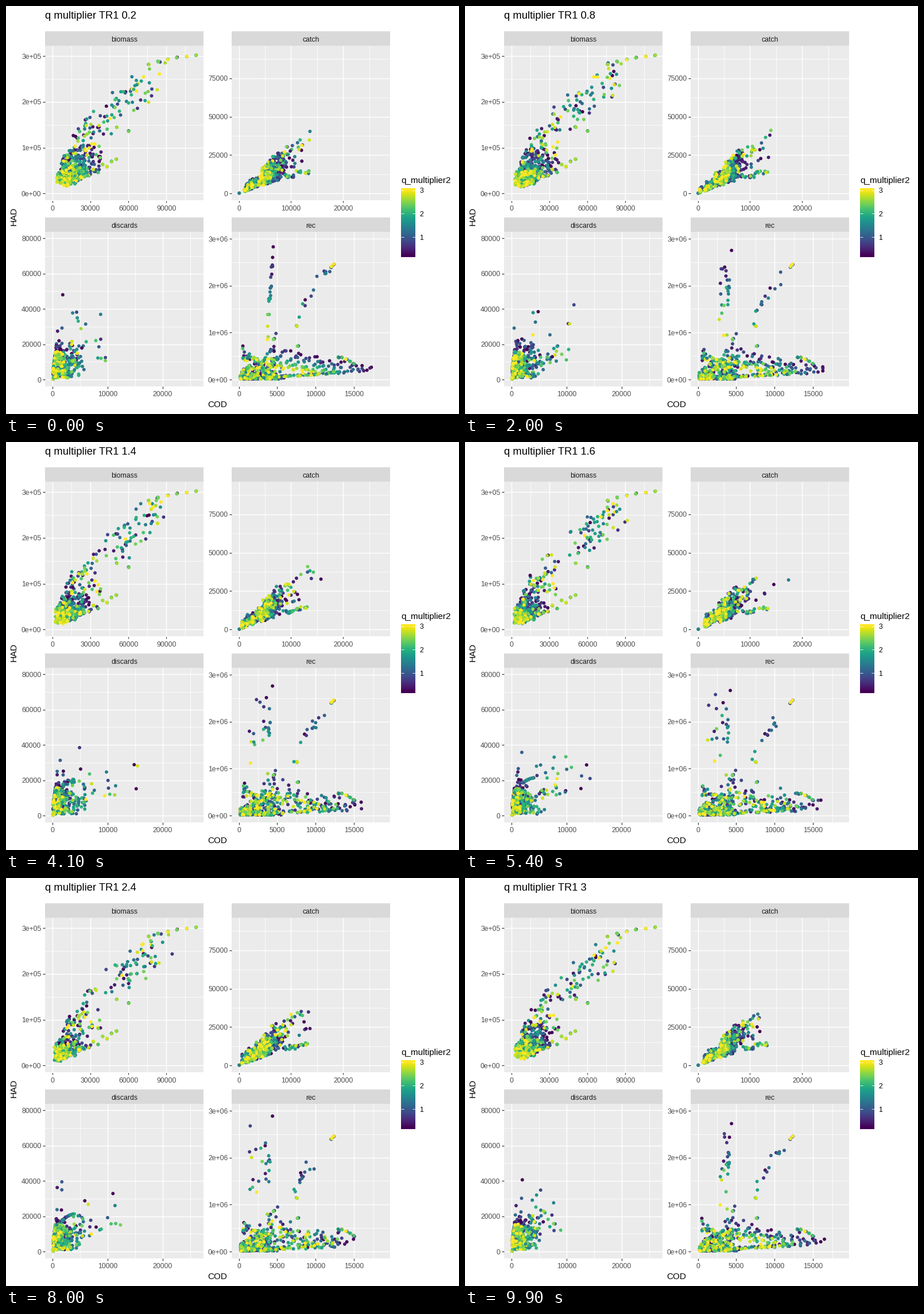
A matplotlib script that plays this animation: 789x710 px, repeating every 10000 ms.

```python
import numpy as np
import matplotlib.pyplot as plt
from matplotlib.animation import FuncAnimation
from matplotlib.patches import Rectangle

W, H, DPI = 789, 710, 100
PT = 72 / DPI
plt.rcParams["font.family"] = "Liberation Sans"

Q = np.linspace(0.2, 3, 15)
STATES = np.linspace(0.2, 3, 15)
# Frame at which each state is reached; the last entry closes the loop.
ARRIVALS = np.cumsum([0, 6] + [7] * 10 + [6] * 4)
MOVE_FRAMES = 3


class Dice:
    """Random numbers that drift from state to state around shared values."""

    def __init__(self, panel, state):
        self.base = np.random.default_rng(panel + 1)
        self.fresh = np.random.default_rng(1000 + 50 * panel + state)

    def u(self, n):
        v = self.base.random(n) + 0.4 * (self.fresh.random(n) - 0.5)
        return 1 - np.abs(1 - np.abs(v))

    def years(self, n):
        return np.repeat(self.u(n), len(Q))

    def spread(self, n, size):
        return size * (2 * self.u(n) - 1)

    def tail(self, n):
        return np.minimum(self.fresh.exponential(size=n), 3.5)

    def q(self, n, top=len(Q)):
        return self.base.choice(Q[:top], n)


def levels(n):
    return np.resize(Q, n)


def effort(dice, q, t):
    """Fishing pressure from 0 to 1; the second multiplier matters less as t grows."""
    weight = 0.88 - 0.2 * t
    return weight * q / 3 + (1 - weight) * dice.u(len(q))


def unrest(t):
    return np.sin(np.pi * t / 3.2)


def fixed(dice, x, y, jitter):
    """Years that hardly react: a few overlapping dots, a bright one often on top."""
    x, y = np.repeat(x, 3), np.repeat(y, 3)
    n = len(x)
    q = np.where(np.arange(n) % 3 == 2, dice.base.choice(Q[9:], n), dice.q(n))
    return x + dice.spread(n, jitter[0]), y + dice.spread(n, jitter[1]), q


def join(*parts):
    x, y, q = (np.concatenate(column) for column in zip(*parts))
    return x * 1000, y * 1000, q


def biomass(dice, t):
    def ceiling(x):
        return 315 * (1 - np.exp(-x / 32))

    calm = min(1, (t - 0.2) / 1.4)

    q = levels(26 * 15)
    n = len(q)
    ratio = 1.4 * 4.5 ** np.clip(dice.years(26) + dice.spread(n, .3), 0, 1)
    reach = .17 + .38 * dice.years(26) ** 1.3
    shrink = np.exp(-(.75 + .3 * t) * effort(dice, q, t) - .2 * (t - .2) * dice.u(n))
    x = 115 * reach * shrink / np.hypot(1, .377 * ratio)
    y = np.minimum(ratio * x, ceiling(x) * (1 - .4 * dice.u(n)))
    cloud = x, y + (25 + 20 * calm) * dice.u(n) ** 2 * np.exp(-x / 9), q

    n = 65
    p = dice.u(n)
    x0, y0 = 30 + 20 * calm, 145 + 40 * calm
    x = x0 + (88 - x0) * p + dice.spread(n, 11)
    y = y0 + (268 - y0) * p + dice.spread(n, 32)
    upper = x, np.minimum(y, ceiling(x) * (1 - .06 * dice.u(n))), dice.q(n)

    n = 65
    x = 7 + 32 * dice.u(n)
    y = np.minimum(75 + 100 * dice.u(n) ** 1.4, ceiling(x) * (1.05 - .35 * dice.u(n)))
    middle = x, y, dice.q(n)

    crest = np.linspace(76, 113.5, 6)
    foot = np.linspace(18, 50.5, 10)
    history = fixed(dice, np.r_[crest, foot, 60.5, 51],
                    np.r_[ceiling(crest) - 4, 1.45 * foot + 6 * np.sin(foot), 136, 145], (.3, .8))
    return join(cloud, upper, middle, history)


def catch(dice, t):
    q = levels(28 * 15)
    n = len(q)
    ratio = 1.15 + 2.1 * np.clip(dice.years(28) + dice.spread(n, .3), 0, 1) ** 1.5
    x = 10 * dice.years(28) ** .6 * np.exp(-.55 * effort(dice, q, t) - .15 * t * dice.u(n))
    cloud = x, ratio * x + 6 * dice.u(n) ** 2 * (.3 + t / 3), q

    n = 50
    p = .4 * dice.tail(n)
    arm = 6.8 + 4.8 * p + dice.spread(n, .8), 17 + 14 * p + dice.spread(n, 6), dice.q(n)

    n = 22
    x = 8.3 + 5.2 * dice.u(n)
    streak = x, 11.3 + 2.5 * (x > 11) + dice.spread(n, 1), dice.q(n)

    n = 6
    reach = dice.tail(n) * unrest(t)
    far = 10 + 4.5 * reach, 16 + 9 * reach + dice.spread(n, 8) + 8, dice.q(n, 8)
    return join(cloud, arm, streak, far, fixed(dice, [.1], [.2], (.05, .1)))


def discards(dice, t):
    q = levels(450)
    n = len(q)
    width = 1.15 * (.45 + np.sin(np.pi * q / 3.2))
    x = np.minimum(.15 - width * np.log(1 - .98 * dice.u(n)), 6 + dice.spread(n, .8))
    y = .8 + 16.5 * dice.u(n) ** 1.1 * (1 - x / 13) + 8 * (q < 1) * dice.u(n) ** 3
    cloud = x, np.minimum(y, 2 + 24 * x), q

    n = 36
    x = .5 + 3.6 * dice.u(n)
    loose = .6 * np.clip(1.6 - t, 0, 1)
    arc = x, 22 * (1 - np.exp(-x / 1.15)) * (1 - loose * dice.u(n)), dice.q(n, 10)

    n = 34
    x = 3.5 + (1.2 + 2.8 * unrest(t)) * dice.tail(n)
    far = x, 4 + 9 * dice.tail(n) + .6 * x, dice.q(n)

    n = 5
    column = .5 + 2 * dice.u(n), 20 + 8 * dice.tail(n), dice.q(n, 8)
    return join(cloud, arc, far, column, fixed(dice, [.1], [.2], (.05, .1)))


def recruits(dice, t):
    loose = (t - .2) / 2.8

    # Arms fan out from the origin: the longer, the lower.
    high = np.linspace(5, 18.5, 8)
    low = np.linspace(7, 17.5, 4)
    x0 = np.repeat(np.r_[high, low], len(Q))
    y0 = np.repeat(np.r_[920 - 36 * high, 11 * low], len(Q))
    q = levels(len(x0))
    n = len(q)
    p = effort(dice, q, t)
    x = x0 * (1 - .5 * p) * (1 - .25 * loose * dice.u(n)) + dice.spread(n, .15)
    y = y0 * (1 - .65 * p) * (1 + dice.spread(n, .1 + .45 * min(1, 2 * loose))) + 15
    arms = x, y, q

    n = 24
    q = levels(n)
    p = effort(dice, q, t)
    lean = 1 - .8 * min(1, 2 * loose) * dice.u(n) ** 2.5
    column = (4.5 - .9 * p) * lean + dice.spread(n, .1), 2850 - 2100 * p + dice.spread(n, 150), q

    n = 13
    p = dice.u(n) * (1 - .3 * loose)
    rise = 4.8 + 6.8 * p + dice.spread(n, .7), 950 + 1400 * p ** 1.2 + dice.spread(n, 100), dice.q(n, 9)

    q = levels(270)
    n = len(q)
    p = effort(dice, q, t)
    x = .15 + 6.2 * dice.u(n) ** 1.2 * np.exp(-.35 * p - .5 * loose * dice.u(n))
    y = 12 + np.minimum(120 + 140 * x, 440) * dice.u(n) ** 2
    low_cloud = x, y, q

    n = 22
    x = .5 + 2 * dice.u(n) ** 1.5
    hook = x, 380 + 420 * np.exp(-(x - .5)) * dice.u(n), dice.q(n)

    tips = np.linspace(13, 15, 5)
    history = fixed(dice, np.r_[12.1, 12.3, 7.5, 7.7, 4.55, tips],
                    np.r_[2400, 2455, 1140, 710, 860, 470 - 35 * (tips - 13) ** 2], (.09, 12))
    return join(arms, column, rise, low_cloud, hook, history)


def plain(v):
    return f"{v:.0f}"


def sci(v):
    return "0e+00" if v == 0 else f"{v:.0e}"


# name, sampler, left, top, x step, x pixels per step, y step, y pixels per step, y format
PANELS = [
    ("biomass", biomass, 68.3, 69.3, 30000, 66.17, 1e5, 79.7, sci),
    ("catch", catch, 393.2, 69.3, 10000, 90.8, 25000, 66.8, plain),
    ("discards", discards, 68.3, 393.1, 10000, 96.15, 20000, 61.45, plain),
    ("rec", recruits, 393.2, 393.1, 5000, 66.85, 1e6, 81.7, sci),
]
PW, PH, STRIP = 275.5, 269.2, 25.3
ORIGIN_X, ORIGIN_Y = 12.4, 256.9

fig = plt.figure(figsize=(W / DPI, H / DPI), dpi=DPI, facecolor="white")
ax = fig.add_axes([0, 0, 1, 1])
ax.axis("off")


def box(x, y, w, h, color):
    ax.add_patch(Rectangle((x, y), w, h, facecolor=color, lw=0, zorder=0))


def line(x, y, color, px, z=1):
    ax.plot(x, y, color=color, lw=px * PT, zorder=z, solid_capstyle="butt")


def label(x, y, text, size=8.8, color="black", ha="center"):
    return ax.text(x, y, text, fontsize=size, color=color, ha=ha, va="baseline")


def draw_panel(name, _, left, top, xstep, xpx, ystep, ypx, fmt):
    right, bottom = left + PW, top + PH
    box(left, top - STRIP, PW, STRIP, "#D9D9D9")
    box(left, top, PW, PH, "#EBEBEB")
    label(left + PW / 2, top - 7.6, name, color="#1A1A1A")
    for half in range(10):
        major = half % 2 == 0
        width = 1.45 if major else 0.75
        x = left + ORIGIN_X + half * xpx / 2
        y = top + ORIGIN_Y - half * ypx / 2
        if x < right:
            line([x, x], [top, bottom], "white", width)
            if major:
                line([x, x], [bottom, bottom + 3.8], "#333333", 1.2)
                label(x, bottom + 17, plain(half // 2 * xstep), color="#4D4D4D")
        if y > top:
            line([left, right], [y, y], "white", width)
            if major:
                line([left - 3.8, left], [y, y], "#333333", 1.2)
                label(left - 6.8, y + 4.6, fmt(half // 2 * ystep), color="#4D4D4D", ha="right")


def draw_legend():
    label(688.3, 308, "q_multiplier2", 11, ha="left")
    ramp = np.linspace(3.07, 0.13, 120)[:, None]
    ax.imshow(ramp, extent=(688.5, 713, 437, 317), cmap="viridis", vmin=0.2, vmax=3,
              aspect="auto", zorder=1)
    for value in (1, 2, 3):
        y = 443 - 40.8 * value
        line([688.5, 693.3], [y, y], "white", 0.8, 2)
        line([708.2, 713], [y, y], "white", 0.8, 2)
        label(720.3, y + 4.6, str(value), ha="left")


def sample_state(state):
    parts = []
    for i, (_, sampler, left, top, xstep, xpx, ystep, ypx, _) in enumerate(PANELS):
        x, y, q = sampler(Dice(i, state), STATES[state])
        parts.append(np.column_stack([
            left + ORIGIN_X + np.maximum(x, 0) * xpx / xstep,
            top + ORIGIN_Y - np.maximum(y, 0) * ypx / ystep, q]))
    return np.concatenate(parts)


for panel in PANELS:
    draw_panel(*panel)
draw_legend()
label(368, 698.5, "COD", 11)
ax.text(14, 366, "HAD", fontsize=11, rotation=90, ha="center", va="center")
title = label(68.3, 21.8, "", 13.2, ha="left")

samples = np.array([sample_state(k) for k in range(len(STATES))])
stacking = samples[0, :, 2] + np.random.default_rng(7).normal(0, 0.7, samples.shape[1])
samples = samples[:, np.argsort(stacking)]

dots = ax.scatter(samples[0, :, 0], samples[0, :, 1], c=samples[0, :, 2], cmap="viridis",
                  vmin=0.2, vmax=3, s=(5.9 * PT) ** 2, linewidths=0, zorder=3)
ax.set_xlim(0, W)
ax.set_ylim(H, 0)


def update(frame):
    k = np.searchsorted(ARRIVALS, frame, side="right") - 1
    f = max(0, frame - ARRIVALS[k + 1] + MOVE_FRAMES) / MOVE_FRAMES
    now = samples[k] * (1 - f) + samples[(k + 1) % len(samples)] * f
    dots.set_offsets(now[:, :2])
    dots.set_array(now[:, 2])
    title.set_text(f"q multiplier TR1 {STATES[k]:.3g}")
    return dots, title


anim = FuncAnimation(fig, update, frames=100, interval=100, repeat=True, repeat_delay=0)
plt.show()
```
